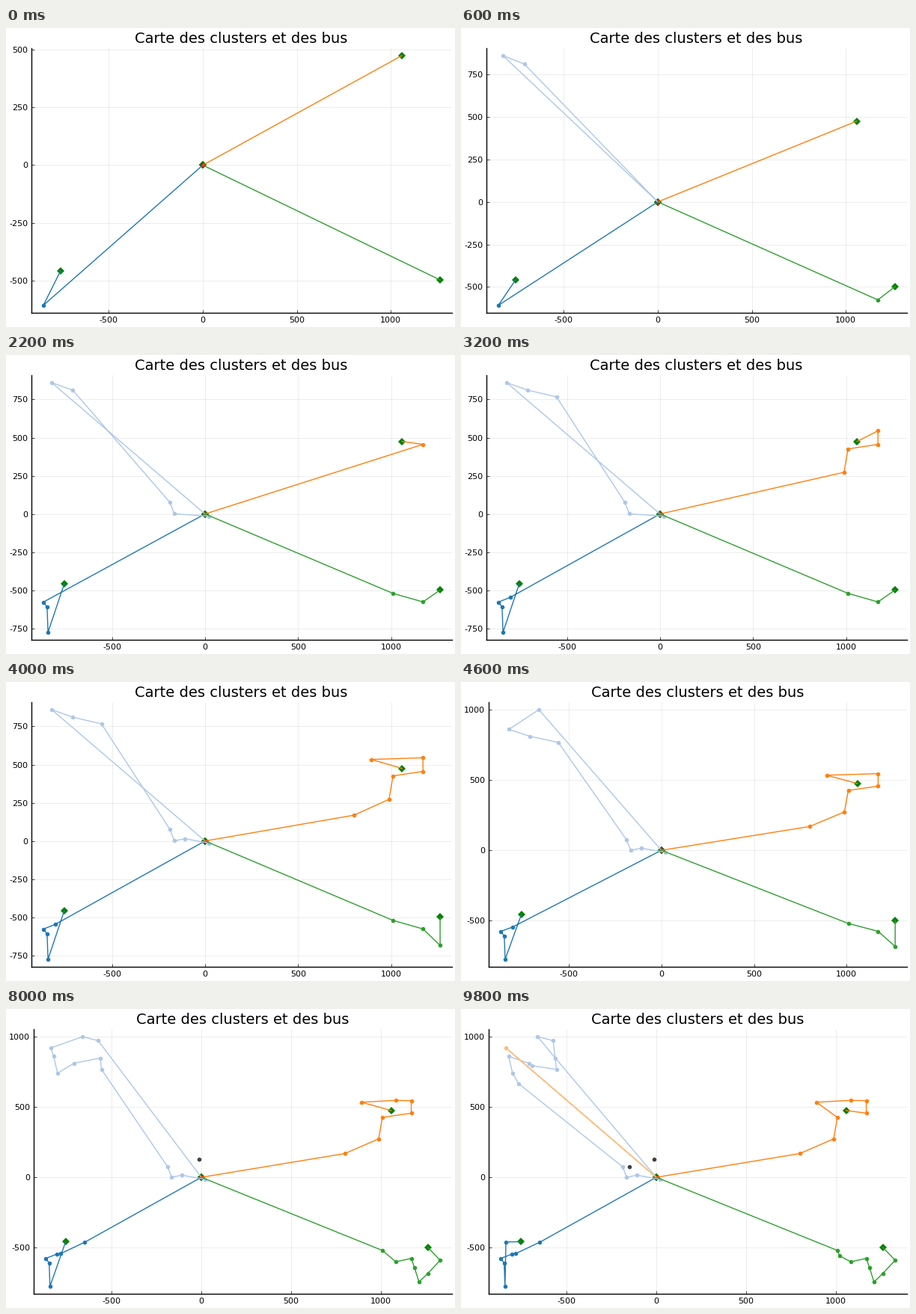
Write a matplotlib script that moves like this. It is 600 px wide and 400 px high and loops after 10 s.

```python
import numpy as np
import matplotlib.pyplot as plt
from matplotlib.animation import FuncAnimation
from matplotlib.ticker import FuncFormatter, MultipleLocator

W, H, DPI = 600, 400, 100
STEPS, STEP_MS = 50, 200
TOP, RIGHT, BOTTOM = 27, 596, 381
MARGIN = 0.03

plt.rcParams["font.family"] = "DejaVu Sans"

DEPOT = (0, 0)
STOPS = {
    # south-west
    "a": (-848, -608), "b": (-868, -577), "c": (-843, -775), "d": (-804, -546),
    "e": (-785, -543), "f": (-650, -462), "g": (-838, -460),
    # north-west
    "h": (-823, 860), "i": (-710, 811), "j": (-188, 75), "k": (-165, 1),
    "l": (21, -14), "m": (-556, 767), "n": (-108, 15), "o": (-661, 1000),
    "p": (-563, 848), "q": (-838, 920), "r": (-575, 972), "s": (-801, 740),
    "t": (-692, 794), "u": (-767, 666),
    # north-east
    "v": (1170, 456), "w": (1170, 545), "x": (892, 534), "y": (1009, 426),
    "z": (988, 273), "A": (800, 169), "B": (1083, 547),
    # south-east
    "D": (1009, -520), "E": (1170, -576), "F": (1262, -684), "G": (1084, -601),
    "H": (1188, -643), "I": (1213, -744), "J": (1331, -590), "K": (1021, -558),
}

# bus: (colour, last point of the route)
BUSES = {
    "blue": ("#1f77b4", (-756, -458)),
    "light": ("#aec7e8", DEPOT),
    "orange": ("#ff7f0e", (1058, 475)),
    "peach": ("#ffbb78", DEPOT),
    "green": ("#2ca02c", (1262, -498)),
}
START = {"blue": "a", "light": "", "orange": "", "peach": "", "green": ""}

# (step, bus, new order of stops)
CHANGES = [
    (1, "green", "E"), (2, "light", "h"), (3, "light", "hi"),
    (5, "blue", "ab"), (6, "green", "DE"), (7, "light", "hij"),
    (8, "light", "hijk"), (9, "light", "hijkl"), (10, "orange", "v"),
    (11, "blue", "bac"), (12, "light", "himjkl"), (13, "blue", "dbac"),
    (14, "orange", "yv"), (15, "orange", "yvw"), (16, "orange", "zyvw"),
    (17, "orange", "Azyvw"), (18, "light", "himjknl"), (19, "green", "DEF"),
    (20, "orange", "Azyvwx"), (23, "light", "ohimjknl"),
    (25, "blue", "edbac"), (26, "green", "DGEF"),
    (29, "light", "ohipmjknl"), (30, "orange", "AzyvwBx"),
    (31, "green", "DGEHF"), (32, "green", "DGEHIF"),
    (33, "light", "oqhipmjknl"), (34, "light", "oqhsipmjknl"),
    (36, "green", "DGEHIFJ"), (37, "light", "roqhsipmjknl"),
    (40, "blue", "fedbac"), (42, "blue", "fedbacg"),
    (43, "light", "proqhsitmjknl"), (44, "light", "proqhsuitmjknl"),
    (46, "orange", "AzyxBwv"), (48, "green", "DKGEHIFJ"),
    (49, "light", "pormtihsujknl"), (49, "peach", "q"),
]
# (step, position) of stops served by no bus
UNSERVED = [(38, (-12, 128)), (49, (-150, 74))]

fig = plt.figure(figsize=(W / DPI, H / DPI), dpi=DPI, facecolor="white")
ax = fig.add_axes([0, 0, 1, 1])
ax.spines[["top", "right"]].set_visible(False)
ax.spines[["left", "bottom"]].set_linewidth(1)
ax.tick_params(direction="in", length=3, width=0.5, pad=3.5, labelsize=8)
ax.set_axisbelow(True)
ax.grid(color="black", alpha=0.1, linewidth=0.5)
ax.xaxis.set_major_locator(MultipleLocator(500))
for axis in (ax.xaxis, ax.yaxis):
    axis.set_major_formatter(FuncFormatter(lambda v, _: str(round(v))))
title = fig.text(0.5, 1 - 20 / H, "Carte des clusters et des bus",
                 size=14, ha="center", va="baseline")


def add_line(xs, ys, style, color, size, zorder, **kw):
    line, = ax.plot(xs, ys, style, color=color, ms=size, mew=0, lw=1,
                    zorder=zorder, snap=False, **kw)
    return line


ends = np.array([DEPOT] + [end for _, end in BUSES.values()])
add_line(*ends.T, "D", "#008000", 5, 2)
add_line([0], [0], "o", "red", 4.3, 2.1)
unserved = add_line([], [], "o", "black", 4, 2.2, alpha=0.75)
lines = {bus: add_line([], [], "-o", color, 4, 3 + rank / 10,
                       markevery=slice(1, -1))
         for rank, (bus, (color, _)) in enumerate(BUSES.items())}


def padded(values):
    lo, hi = min(values), max(values)
    pad = MARGIN * (hi - lo)
    return lo - pad, hi + pad


def fit_axes(points):
    xs, ys = zip(*points)
    ylim = padded(ys)
    tall = ylim[1] > 1000
    left = 37 if tall else 34
    ax.set_position([left / W, 1 - BOTTOM / H,
                     (RIGHT - left) / W, (BOTTOM - TOP) / H])
    ax.set_xlim(padded(xs))
    ax.set_ylim(ylim)
    ax.yaxis.set_major_locator(MultipleLocator(500 if tall else 250))
    title.set_x((left + RIGHT - 1) / 2 / W)


def draw(step):
    routes = dict(START)
    routes.update((bus, order) for at, bus, order in CHANGES if at <= step)
    points = [tuple(p) for p in ends]
    for bus, order in routes.items():
        stops = [STOPS[s] for s in order]
        end = BUSES[bus][1]
        path = [DEPOT, *stops, end] if stops or end != DEPOT else []
        lines[bus].set_data([p[0] for p in path], [p[1] for p in path])
        points += stops
    left_out = [p for at, p in UNSERVED if at <= step]
    unserved.set_data([p[0] for p in left_out], [p[1] for p in left_out])
    fit_axes(points + left_out)
    return [*lines.values(), unserved, title]


anim = FuncAnimation(fig, draw, frames=STEPS, interval=STEP_MS,
                     init_func=lambda: draw(0), repeat=True, blit=False)
plt.show()
```
